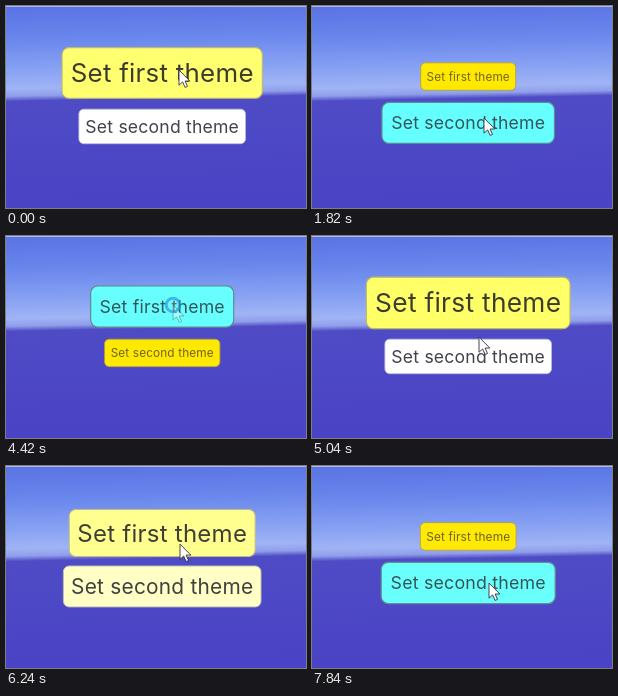
Recreate the animation shown at these times as an HTML page. Size 300 by 202 pixels, loop 8000 ms.

```html
<!DOCTYPE html>
<html lang="en">
<head>
<meta charset="utf-8">
<title>Button themes</title>
<style>
  html, body { margin: 0; width: 100%; height: 100%; overflow: hidden; background: #4843c2; }
  svg { display: block; width: 100vw; height: 100vh; }
  text { font-family: Inter, Roboto, sans-serif; text-anchor: middle; letter-spacing: .011em; }
</style>
</head>
<body>
<svg viewBox="0 0 300 202" preserveAspectRatio="none">
  <defs>
    <linearGradient id="scene" gradientUnits="userSpaceOnUse" x1="0" y1="0" x2="4" y2="202">
      <stop offset="0" stop-color="#5a73e3"/>
      <stop offset=".16" stop-color="#6886ec"/>
      <stop offset=".3" stop-color="#849ff2"/>
      <stop offset=".41" stop-color="#a0b4f5"/>
      <stop offset=".447" stop-color="#8f9eea"/>
      <stop offset=".472" stop-color="#4f4bc5"/>
      <stop offset="1" stop-color="#4a43c5"/>
    </linearGradient>
  </defs>
  <rect width="300" height="202" fill="url(#scene)"/>
  <rect width="300" height=".7" fill="#d4d6ea"/>
  <g id="buttons"></g>
  <path id="pointer" d="M0 0V15.2L3.6 11.9L6.1 17.4L8.5 16.4L6.1 11H10.8Z"
        fill="#fff" stroke="#30303c" stroke-width=".9" stroke-linejoin="round"/>
  <circle id="press" r="6.8" fill="#8ee6f6" fill-opacity=".3" stroke="#2391de" stroke-width="3"/>
</svg>
<script>
const LOOP = 8000;
const TICK = 201;
const FADE = 400;
const NS = 'http://www.w3.org/2000/svg';

const home = { x: 173, y: 64 };
const moves = [
  { from: 200, to: 1020, x: 172, y: 112 },
  { from: 2220, to: 2820, x: 163, y: 174 },
  { from: 3020, to: 4020, x: 167, y: 69 },
  { from: 4820, to: 5440, x: 167, y: 166 },
  { from: 5440, to: 6340, x: 175, y: 66 },
  { from: 6440, to: 6840, x: 177, y: 117 }
];
const clicks = [1240, 4420, 7460];

const themes = [
  { font: 17.6, height: 34.5, fill: [255, 255, 255], hover: [255, 255, 102],
    ink: [66, 66, 78], inkHover: [60, 60, 44], edge: [190, 190, 222], edgeHover: [186, 186, 110] },
  { font: 11.75, height: 27.4, fill: [255, 233, 0], hover: [102, 255, 255],
    ink: [112, 100, 28], inkHover: [52, 86, 92], edge: [176, 156, 62], edgeHover: [98, 138, 150] }
];

const clamp = v => Math.min(1, Math.max(0, v));
const lerp = (a, b, k) => a + (b - a) * k;
const mix = (a, b, k) => a.map((v, i) => lerp(v, b[i], k));
const rgb = c => `rgb(${c.map(Math.round)})`;
const ramp = (t, from, to) => clamp((t - from) / (to - from));
const easeOut = k => 1 - (1 - k) ** 2;

const pointerAt = t => moves.reduce((p, m) => {
  const k = ramp(t, m.from, m.to);
  return { x: lerp(p.x, m.x, k), y: lerp(p.y, m.y, k) };
}, home);

// Each click swaps the theme.
const themeAt = t => clicks.reduce((theme, at, i) =>
  lerp(theme, (i + 1) % 2, easeOut(ramp(t, at, at + FADE * 1.1))), 0);

const pressAt = t => Math.max(...clicks.map(at => clamp(1 - Math.abs(t - at - 90) / 240)));

// A hovered button grows, bounces a little past full size, then shrinks back.
function hoverAt(t, visits, bounce) {
  return visits.reduce((sum, [enter, leave]) => {
    const settle = ramp(t, enter + FADE, enter + 2 * FADE);
    const grown = easeOut(ramp(t, enter, enter + FADE)) + bounce * Math.sin(Math.PI * settle);
    return sum + grown * (1 - ramp(t, leave, leave + FADE));
  }, 0);
}

function add(parent, name) {
  return parent.appendChild(document.createElementNS(NS, name));
}

function set(node, attributes) {
  for (const [name, value] of Object.entries(attributes)) node.setAttribute(name, value);
}

function makeButton({ label, widths, visits, bounce, centerOf }) {
  const group = add(document.getElementById('buttons'), 'g');
  const box = add(group, 'rect');
  const text = add(group, 'text');
  set(box, { rx: 4.8, 'stroke-width': .8 });
  text.textContent = label;

  return (t, theme) => {
    const hover = hoverAt(t, visits, bounce);
    const [a, b] = themes;
    const width = lerp(...widths, theme);
    const height = lerp(a.height, b.height, theme);
    const font = lerp(a.font, b.font, theme);
    const color = (rest, active) =>
      rgb(mix(mix(a[rest], b[rest], theme), mix(a[active], b[active], theme), clamp(hover)));

    set(group, { transform: `translate(156.2 ${centerOf(height)}) scale(${1 + hover / 2})` });
    set(box, {
      x: -width / 2, y: -height / 2, width, height,
      fill: color('fill', 'hover'), stroke: color('edge', 'edgeHover')
    });
    set(text, { y: font * .36, 'font-size': font, fill: color('ink', 'inkHover') });
  };
}

const buttons = [
  makeButton({
    label: 'Set first theme', widths: [136.4, 95], bounce: .08,
    visits: [[-300, 400], [3620, 5020], [6040, 6430]],
    centerOf: height => 84.2 - height / 2
  }),
  makeButton({
    label: 'Set second theme', widths: [166.6, 115], bounce: 0,
    visits: [[610, 2320], [3220, 3560], [5630, 5980], [6430, LOOP]],
    centerOf: height => 103.2 + height / 2
  })
];
const pointer = document.getElementById('pointer');
const press = document.getElementById('press');

function draw(time) {
  const t = Math.floor((time % LOOP + 20) / TICK) * TICK;
  const theme = themeAt(t);
  buttons.forEach(update => update(t, theme));
  const { x, y } = pointerAt(t);
  const pressed = pressAt(t);
  const transform = `translate(${x} ${y})`;
  set(pointer, { transform, opacity: 1 - pressed });
  set(press, { transform, opacity: pressed });
}

const start = performance.now();
function frame() {
  draw(performance.now() - start);
  requestAnimationFrame(frame);
}
frame();
</script>
</body>
</html>
```
